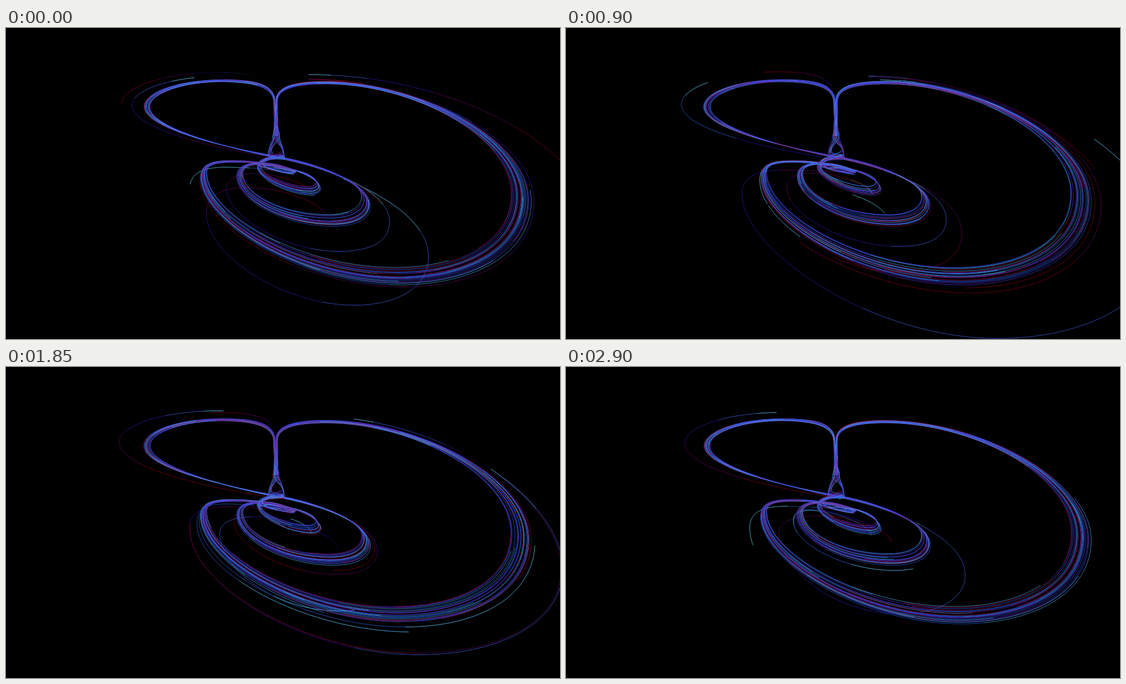
Write an HTML page without scripts that moves like this. It is 998 by 561 pixels and loops after 2.95 s.

```html
<!DOCTYPE html>
<html lang="en">
<head>
<meta charset="utf-8">
<title>Attractor trails</title>
<style>
html, body { margin: 0; width: 100%; height: 100%; overflow: hidden; background: #000; }
svg { display: block; width: 100%; height: 100%; background: #000; }
path { fill: none; }

/* Bands: each strand is a fixed blend between an inner and an outer curve. */
.band path {
  stroke: var(--c);
  stroke-width: .9;
  stroke-opacity: .82;
  stroke-dasharray: calc(var(--l) * var(--p)) calc((1 - var(--l)) * var(--p));
  animation:
    var(--m) 9999s linear calc((var(--a) + var(--b)) * -9999s) infinite,
    flow 2.95s steps(59) infinite;
}
@keyframes flow {
  from { stroke-dashoffset: calc((var(--o) + var(--s) + var(--e)) * -1 * var(--p)); }
  to { stroke-dashoffset: calc((var(--o) + var(--s) + var(--e) + 2) * -1 * var(--p)); }
}
.band path:nth-child(1) { --c: #48a8e8; --o: 0; --l: .19; }
.band path:nth-child(2) { --c: #2a5cf0; --o: .19; --l: .26; }
.band path:nth-child(3) { --c: #5a2cd0; --o: .45; --l: .2; }
.band path:nth-child(4) { --c: #980c40; --o: .65; --l: .15; }

/* Spread strands across the band and along it. */
.band g { --a: 0; --b: 0; --s: 0; --e: 0; }
.band g:nth-child(5n+1) { --a: .4; }
.band g:nth-child(5n+2) { --a: .8; }
.band g:nth-child(5n+3) { --a: .2; }
.band g:nth-child(5n+4) { --a: .6; }
.band g:nth-child(7n+1) { --b: .09; }
.band g:nth-child(7n+2) { --b: .18; }
.band g:nth-child(7n+3) { --b: .03; }
.band g:nth-child(7n+4) { --b: .12; }
.band g:nth-child(7n+5) { --b: .06; }
.band g:nth-child(7n+6) { --b: .15; }
.band g:nth-child(4n+1) { --s: .5; }
.band g:nth-child(4n+2) { --s: .25; }
.band g:nth-child(4n+3) { --s: .75; }
.band g:nth-child(3n+1) { --e: .16; }
.band g:nth-child(3n+2) { --e: .08; }

.right { --m: right; --p: 1850px; }
.left { --m: left; --p: 1350px; }
.core { --m: core; --p: 480px; }
.cone1 { --m: cone1; --p: 330px; }
.cone2 { --m: cone2; --p: 310px; }
@keyframes right {
  from { d: path("M490 195C490 160 489 150 489 132C490 112 514 102 570 101C730 99 908 195 908 298C908 385 815 431 700 431C530 431 362 335 362 260C362 246 378 243 408 242C450 241 490 250 520 262"); }
  to { d: path("M482 195C482 160 486 150 486 132C486 108 510 97 570 96C740 94 947 200 947 312C947 410 840 464 712 464C530 464 350 350 350 270C350 244 372 239 408 239C450 239 490 246 522 258"); }
}
@keyframes left {
  from { d: path("M484 195C484 160 482 150 482 132C480 108 450 98 390 97C320 97 260 118 260 142C260 178 385 213 480 233C560 248 640 275 640 303C640 325 615 336 580 336C500 336 427 300 427 262C427 250 440 247 455 246C480 245 500 249 520 256"); }
  to { d: path("M489 195C489 160 485 150 485 132C483 102 455 93 390 93C310 93 247 115 247 142C247 180 380 212 480 230C560 242 657 280 657 322C657 345 630 358 590 358C500 358 415 310 415 268C415 250 430 245 450 243C475 242 500 246 520 260"); }
}
@keyframes core {
  from { d: path("M470 249C520 251 558 265 558 277C558 285 545 286 530 284C505 281 462 265 460 252C460 240 480 236 498 228"); }
  to { d: path("M440 243C520 247 568 275 568 292C568 302 555 303 540 301C500 297 452 270 452 250C452 238 465 230 500 234"); }
}
@keyframes cone1 {
  from { d: path("M520 262C490 262 456 252 457 243C460 232 502 240 500 231C496 224 476 232 479 218C482 208 495 204 493 194C490 182 484 178 484 160"); }
  to { d: path("M524 258C490 246 452 256 456 247C462 238 500 230 502 235C500 240 470 236 472 226C474 212 480 202 481 194C483 184 487 176 487 160"); }
}
@keyframes cone2 {
  from { d: path("M508 260C480 258 452 250 462 238C470 230 505 222 498 218C492 208 480 206 480 196C482 182 489 176 489 160"); }
  to { d: path("M520 264C480 260 450 244 468 240C480 236 505 242 501 230C500 210 490 200 493 190C490 178 486 172 486 160"); }
}

/* Strays: the same run repeated by ever older layers; the last one wipes. */
.stray path {
  d: var(--d);
  stroke: var(--c);
  stroke-width: .9;
  stroke-dasharray: 100 200;
  stroke-dashoffset: 101;
  animation: var(--m) 2.95s calc(var(--t) + var(--age) - 5.9s) infinite;
}
.stray path:nth-child(1) { --c: #700010; --age: 0s; }
.stray path:nth-child(2) { --c: #220448; --age: .25s; }
.stray path:nth-child(3) { --c: #0c0c70; --age: .45s; }
.stray path:nth-child(4) { --c: #1f4c84; --age: .7s; }
.stray path:nth-child(5) { --c: #429a9a; --age: .95s; }
.stray path:nth-child(6) { --c: #000; --age: 1.1s; stroke-width: 2.4; }
.east { --m: east; }
.west { --m: west; }
.ring { --m: ring; }
@keyframes east {
  0% { stroke-dashoffset: 100; animation-timing-function: steps(11); }
  18.644% { stroke-dashoffset: 92; animation-timing-function: steps(9); }
  33.898% { stroke-dashoffset: 72; animation-timing-function: steps(4); }
  40.678% { stroke-dashoffset: 44; animation-timing-function: steps(4); }
  47.458% { stroke-dashoffset: 15; animation-timing-function: steps(6); }
  57.627% { stroke-dashoffset: 0; animation-timing-function: step-end; }
  69.492%, 100% { stroke-dashoffset: 101; }
}
@keyframes west {
  0% { stroke-dashoffset: 100; animation-timing-function: steps(14); }
  23.729% { stroke-dashoffset: 73; animation-timing-function: steps(8); }
  37.288% { stroke-dashoffset: 52; animation-timing-function: steps(3); }
  42.373% { stroke-dashoffset: 43; animation-timing-function: steps(4); }
  49.153% { stroke-dashoffset: 0; animation-timing-function: step-end; }
  61.017%, 100% { stroke-dashoffset: 101; }
}
@keyframes ring {
  0% { stroke-dashoffset: 100; animation-timing-function: steps(7); }
  11.864% { stroke-dashoffset: 64; animation-timing-function: steps(8); }
  25.424% { stroke-dashoffset: 22; animation-timing-function: steps(7); }
  37.288% { stroke-dashoffset: 0; animation-timing-function: step-end; }
  49.153%, 100% { stroke-dashoffset: 101; }
}

/* Gates cut a stray at the loop seam. */
.g1 { animation: g1 2.95s step-end infinite; }
.g2 { animation: g2 2.95s step-end infinite; }
.g3 { animation: g3 2.95s step-end infinite; }
.g4 { animation: g4 2.95s step-end infinite; }
.g5 { animation: g5 2.95s step-end infinite; }
@keyframes g1 { 0% { opacity: 1; } 40.678%, 100% { opacity: 0; } }
@keyframes g2 { 0% { opacity: 1; } 59.322%, 100% { opacity: 0; } }
@keyframes g3 { 0% { opacity: 1; } 84.746%, 100% { opacity: 0; } }
@keyframes g4 { 0% { opacity: 0; } 13.559%, 100% { opacity: 1; } }
@keyframes g5 { 0% { opacity: 0; } 37.288%, 100% { opacity: 1; } }
</style>
</head>
<body>
<svg viewBox="0 0 998 561">
<g class="stray">
<g class="east g2" style="--t:-1.1s;--d:path('M545 84C810 84 1070 220 1070 385C1070 490 940 560 777 560C550 560 317 400 317 300C317 262 355 256 400 256C450 257 490 258 520 264')"><path pathLength="100"/><path pathLength="100"/><path pathLength="100"/><path pathLength="100"/><path pathLength="100"/><path pathLength="100"/></g>
<g class="east" style="--t:-.1s;--d:path('M545 87C790 87 1003 240 1003 365C1003 460 890 519 745 519C540 519 331 395 331 290C331 258 360 252 400 252C450 253 490 256 520 262')"><path pathLength="100"/><path pathLength="100"/><path pathLength="100"/><path pathLength="100"/><path pathLength="100"/><path pathLength="100"/></g>
<g class="east g4" style="--t:.4s;--d:path('M545 88C790 88 1000 240 1000 365C1000 460 890 516 740 516C540 516 331 395 331 290C331 258 360 251 400 251C450 252 490 256 520 262')"><path pathLength="100"/><path pathLength="100"/><path pathLength="100"/><path pathLength="100"/><path pathLength="100"/><path pathLength="100"/></g>
<g class="east g3" style="--t:-.45s;--d:path('M545 92C760 92 964 205 964 320C964 420 860 478 730 478C540 478 344 370 344 282C344 252 365 247 400 247C450 248 490 254 520 262')"><path pathLength="100"/><path pathLength="100"/><path pathLength="100"/><path pathLength="100"/><path pathLength="100"/><path pathLength="100"/></g>
<g class="east g1" style="--t:-1.55s;--d:path('M545 94C745 94 951 200 951 312C951 412 850 467 715 467C535 467 349 360 349 275C349 246 370 242 400 242C450 243 490 252 520 260')"><path pathLength="100"/><path pathLength="100"/><path pathLength="100"/><path pathLength="100"/><path pathLength="100"/><path pathLength="100"/></g>
<g class="east g3" style="--t:-.3s;--d:path('M545 93C748 93 953 200 953 314C953 414 852 469 718 469C536 469 348 362 348 277C348 248 370 243 400 243C450 244 490 252 520 260')"><path pathLength="100"/><path pathLength="100"/><path pathLength="100"/><path pathLength="100"/><path pathLength="100"/><path pathLength="100"/></g>

<g class="west g2" style="--t:-1.1s;--d:path('M478 105C465 85 430 80 385 80C290 80 208 105 208 138C208 185 380 222 500 238')"><path pathLength="100"/><path pathLength="100"/><path pathLength="100"/><path pathLength="100"/><path pathLength="100"/><path pathLength="100"/></g>
<g class="west" style="--t:.35s;--d:path('M480 108C466 84 430 79 383 79C285 79 204 104 204 136C204 184 380 222 500 238')"><path pathLength="100"/><path pathLength="100"/><path pathLength="100"/><path pathLength="100"/><path pathLength="100"/><path pathLength="100"/></g>
<g class="west g5" style="--t:1.35s;--d:path('M478 105C466 87 430 82 387 82C295 82 214 106 214 138C214 184 380 221 500 237')"><path pathLength="100"/><path pathLength="100"/><path pathLength="100"/><path pathLength="100"/><path pathLength="100"/><path pathLength="100"/></g>
<g class="west g1" style="--t:-1.75s;--d:path('M478 108C466 92 430 87 390 87C305 87 227 109 227 140C227 182 380 219 500 236')"><path pathLength="100"/><path pathLength="100"/><path pathLength="100"/><path pathLength="100"/><path pathLength="100"/><path pathLength="100"/></g>

<g class="ring g1" style="--t:-1.2s;--d:path('M500 240C620 265 761 330 761 412C761 465 710 500 627 500C500 500 361 410 361 335C361 295 400 287 440 288C500 290 555 310 575 335')"><path pathLength="100"/><path pathLength="100"/><path pathLength="100"/><path pathLength="100"/><path pathLength="100"/><path pathLength="100"/></g>
<g class="ring g1" style="--t:-1.2s;--d:path('M500 237C590 255 691 295 691 350C691 386 655 403 600 403C500 403 397 338 397 290C397 262 440 260 470 264C510 270 550 285 552 300')"><path pathLength="100"/><path pathLength="100"/><path pathLength="100"/><path pathLength="100"/><path pathLength="100"/><path pathLength="100"/></g>
<g class="ring g3" style="--t:-.25s;--d:path('M500 237C590 255 685 295 685 345C685 380 650 394 600 394C500 394 398 335 398 288C398 260 440 260 470 263C510 270 550 285 550 300')"><path pathLength="100"/><path pathLength="100"/><path pathLength="100"/><path pathLength="100"/><path pathLength="100"/><path pathLength="100"/></g>
<g class="ring" style="--t:.35s;--d:path('M500 237C600 258 713 305 713 370C713 415 670 440 600 440C480 440 385 360 385 300C385 265 460 265 510 278C560 290 600 315 600 330')"><path pathLength="100"/><path pathLength="100"/><path pathLength="100"/><path pathLength="100"/><path pathLength="100"/><path pathLength="100"/></g>
<g class="ring g5" style="--t:1.8s;--d:path('M500 237C600 258 719 310 719 375C719 420 670 445 600 445C480 445 383 360 383 300C383 265 460 265 500 272C530 280 586 300 586 316')"><path pathLength="100"/><path pathLength="100"/><path pathLength="100"/><path pathLength="100"/><path pathLength="100"/><path pathLength="100"/></g>
<g class="ring g5" style="--t:1.1s;--d:path('M500 237C590 255 669 290 669 332C669 360 640 374 595 374C500 374 410 320 410 278C410 256 440 256 470 262C510 270 550 290 550 305')"><path pathLength="100"/><path pathLength="100"/><path pathLength="100"/><path pathLength="100"/><path pathLength="100"/><path pathLength="100"/></g>
<g class="ring g5" style="--t:1.45s;--d:path('M500 237C590 254 664 288 664 328C664 354 636 367 592 367C500 367 409 318 409 276C409 254 440 254 470 260C520 272 586 295 586 314')"><path pathLength="100"/><path pathLength="100"/><path pathLength="100"/><path pathLength="100"/><path pathLength="100"/><path pathLength="100"/></g>
</g>

<g class="band right">
<g><path/><path/><path/><path/></g><g><path/><path/><path/><path/></g><g><path/><path/><path/><path/></g><g><path/><path/><path/><path/></g>
<g><path/><path/><path/><path/></g><g><path/><path/><path/><path/></g><g><path/><path/><path/><path/></g><g><path/><path/><path/><path/></g>
<g><path/><path/><path/><path/></g><g><path/><path/><path/><path/></g><g><path/><path/><path/><path/></g><g><path/><path/><path/><path/></g>
<g><path/><path/><path/><path/></g><g><path/><path/><path/><path/></g><g><path/><path/><path/><path/></g><g><path/><path/><path/><path/></g>
<g><path/><path/><path/><path/></g><g><path/><path/><path/><path/></g><g><path/><path/><path/><path/></g><g><path/><path/><path/><path/></g>
<g><path/><path/><path/><path/></g><g><path/><path/><path/><path/></g><g><path/><path/><path/><path/></g><g><path/><path/><path/><path/></g>
</g>
<g class="band left">
<g><path/><path/><path/><path/></g><g><path/><path/><path/><path/></g><g><path/><path/><path/><path/></g><g><path/><path/><path/><path/></g>
<g><path/><path/><path/><path/></g><g><path/><path/><path/><path/></g><g><path/><path/><path/><path/></g><g><path/><path/><path/><path/></g>
<g><path/><path/><path/><path/></g><g><path/><path/><path/><path/></g><g><path/><path/><path/><path/></g><g><path/><path/><path/><path/></g>
<g><path/><path/><path/><path/></g><g><path/><path/><path/><path/></g><g><path/><path/><path/><path/></g><g><path/><path/><path/><path/></g>
<g><path/><path/><path/><path/></g><g><path/><path/><path/><path/></g><g><path/><path/><path/><path/></g><g><path/><path/><path/><path/></g>
</g>
<g class="band core">
<g><path/><path/><path/><path/></g><g><path/><path/><path/><path/></g><g><path/><path/><path/><path/></g><g><path/><path/><path/><path/></g>
<g><path/><path/><path/><path/></g><g><path/><path/><path/><path/></g><g><path/><path/><path/><path/></g><g><path/><path/><path/><path/></g>
<g><path/><path/><path/><path/></g><g><path/><path/><path/><path/></g><g><path/><path/><path/><path/></g><g><path/><path/><path/><path/></g>
<g><path/><path/><path/><path/></g><g><path/><path/><path/><path/></g><g><path/><path/><path/><path/></g><g><path/><path/><path/><path/></g>
</g>
<g class="band cone1">
<g><path/><path/><path/><path/></g><g><path/><path/><path/><path/></g><g><path/><path/><path/><path/></g><g><path/><path/><path/><path/></g>
<g><path/><path/><path/><path/></g><g><path/><path/><path/><path/></g><g><path/><path/><path/><path/></g><g><path/><path/><path/><path/></g>
<g><path/><path/><path/><path/></g><g><path/><path/><path/><path/></g><g><path/><path/><path/><path/></g><g><path/><path/><path/><path/></g>
</g>
<g class="band cone2">
<g><path/><path/><path/><path/></g><g><path/><path/><path/><path/></g><g><path/><path/><path/><path/></g><g><path/><path/><path/><path/></g>
<g><path/><path/><path/><path/></g><g><path/><path/><path/><path/></g><g><path/><path/><path/><path/></g><g><path/><path/><path/><path/></g>
<g><path/><path/><path/><path/></g><g><path/><path/><path/><path/></g><g><path/><path/><path/><path/></g><g><path/><path/><path/><path/></g>
</g>
</svg>
</body>
</html>
```
